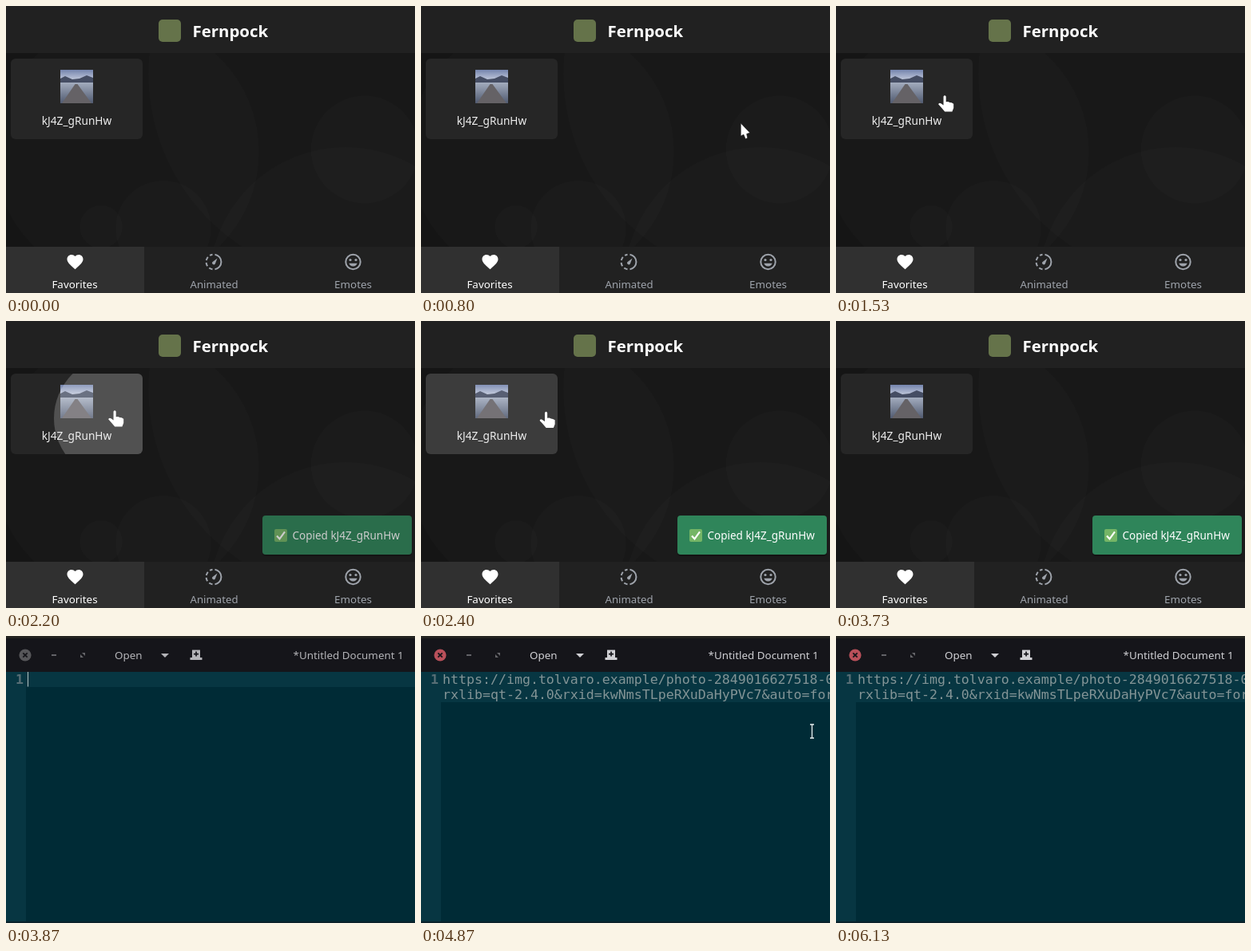
An HTML page that plays this animation: 512 px wide and 360 px high, repeating every 7140 ms.

```html
<!DOCTYPE html>
<html lang="en">
<head>
<meta charset="utf-8">
<title>Copy and paste demo</title>
<style>
  html, body { margin: 0; width: 100%; height: 100%; overflow: hidden; background: #151515; }
  svg { display: block; width: 512px; height: 360px; }
  text { font: 13.4px "Noto Sans", sans-serif; white-space: pre; }
  .mid { text-anchor: middle; }
  .title { font-size: 20.4px; font-weight: bold; }
  .code { font: 16.6px "DejaVu Sans Mono", monospace; fill: #839496; }
  .num { font-weight: bold; fill: #586e75; }
  .glow { fill: #fff; fill-opacity: .013; }
  .tab { fill: #9ea3ab; }
</style>
</head>
<body>
<svg viewBox="0 0 512 360">
  <defs>
    <clipPath id="cardClip"><rect x="6" y="66" width="165" height="101" rx="6"/></clipPath>
    <linearGradient id="sky" x2="0" y2="1">
      <stop stop-color="#7484ad"/><stop offset="1" stop-color="#d5dae6"/>
    </linearGradient>
    <linearGradient id="lake" x2="0" y2="1">
      <stop stop-color="#a3acbe"/><stop offset="1" stop-color="#505a70"/>
    </linearGradient>
  </defs>

  <g id="app">
    <rect width="512" height="360" fill="#151515"/>
    <g class="glow">
      <circle cx="151" cy="183" r="166"/>
      <circle cx="437" cy="85" r="259"/>
      <circle cx="449" cy="180" r="67.5"/>
      <circle cx="425" cy="348" r="171"/>
      <circle cx="197" cy="279" r="60"/>
      <circle cx="119" cy="277" r="27"/>
    </g>
    <rect width="512" height="59" fill="#212121"/>
    <rect x="191" y="17" width="28" height="28" rx="5" fill="#65734a"/>
    <text class="title" x="233.5" y="39" fill="#fff">Fernpock</text>

    <g clip-path="url(#cardClip)">
      <rect x="6" y="66" width="165" height="101" fill="#262626"/>
      <rect x="68" y="80" width="41" height="16" fill="url(#sky)"/>
      <path d="M68 91l6-3 9 4 9-1 9-4 8 3v7H68z" fill="#454d63"/>
      <rect x="68" y="96" width="41" height="26" fill="url(#lake)"/>
      <path d="M86.5 98h3l17.5 24H70z" fill="#656266"/>
      <circle id="ripple" cx="138" cy="122" fill="#fff"/>
      <text class="mid" x="88.5" y="149" fill="#eee" style="font-size:13.7px">kJ4Z_gRunHw</text>
    </g>

    <rect y="302" width="512" height="58" fill="#212121"/>
    <rect y="302" width="173" height="58" fill="#303030"/>
    <path transform="translate(74.5 309)" fill="#fff" d="M12 21.35l-1.45-1.32C5.4 15.36 2 12.28 2 8.5 2 5.42 4.42 3 7.5 3c1.74 0 3.41.81 4.5 2.09C13.09 3.81 14.76 3 16.5 3 19.58 3 22 5.42 22 8.5c0 3.78-3.4 6.86-8.55 11.54z"/>
    <text class="mid" x="86" y="354" fill="#fff">Favorites</text>
    <g class="tab">
      <g fill="none" stroke="#9ea3ab" stroke-width="2">
        <path d="M261.5 311.8a9.3 9.3 0 0 1 0 18.4"/>
        <path d="M258.5 330.2a9.3 9.3 0 0 1 0-18.4" stroke-dasharray="4.6 3"/>
        <circle cx="434.5" cy="321" r="9.2"/>
      </g>
      <path d="M264.5 316.5l-2.7 7a2.1 2.1 0 0 1-3.5-2.3z"/>
      <circle cx="431" cy="318.5" r="1.6"/><circle cx="438" cy="318.5" r="1.6"/>
      <path d="M429.3 322.8h10.4a5.5 5.5 0 0 1-10.4 0z"/>
      <text class="mid" x="260.5" y="354" style="font-size:13.2px">Animated</text>
      <text class="mid" x="434.5" y="354">Emotes</text>
    </g>

    <g id="toast">
      <rect x="321" y="245" width="187" height="50" rx="4" fill="#000" opacity=".3"/>
      <rect x="321" y="244" width="187" height="49" rx="4" fill="#2f855a"/>
      <rect x="336" y="261" width="16" height="16" rx="2" fill="#74b566"/>
      <path d="M339 269.5l3.5 3.8 6.5-9" fill="none" stroke="#fff" stroke-width="2.2"/>
      <text x="358.5" y="274" fill="#fff" style="font-size:13.5px">Copied kJ4Z_gRunHw</text>
    </g>
  </g>

  <g id="editor">
    <rect width="512" height="360" fill="#002b36"/>
    <rect width="512" height="45" fill="#15151a"/>
    <rect width="512" height="3" fill="#232320"/>
    <circle id="close" cx="24" cy="24" r="7.6"/>
    <path d="M21.3 21.3l5.4 5.4m0-5.4l-5.4 5.4" stroke="#15151a" stroke-width="1.8"/>
    <path d="M57 24h6" stroke="#77777b" stroke-width="1.6"/>
    <path d="M95 21h4v4zM93 23l4 4h-4z" fill="#66666a"/>
    <g id="bar">
      <text x="136" y="28.7">Open</text>
      <path d="M194 22h10l-5 5z"/>
      <path fill-rule="evenodd" d="M233 17.5h10v9.5h2.5v3h-15v-3h2.5zM237.2 19.5v2.2h-2.2v1.7h2.2v2.2h1.7v-2.2h2.2v-1.7h-2.2v-2.2z"/>
      <text x="359.5" y="28.7">*Untitled Document 1</text>
    </g>
    <rect y="45" width="25" height="315" fill="#073642"/>
    <rect id="line" y="45" width="512" fill="#073642"/>
    <text class="code num" x="12" y="60">1</text>
    <g id="pasted">
      <text class="code" x="27" y="60">https://img.tolvaro.example/photo-2849016627518-0</text>
      <text class="code" x="27" y="79">rxlib=qt-2.4.0&amp;rxid=kwNmsTLpeRXuDaHyPVc7&amp;auto=for</text>
    </g>
    <rect id="caret" x="27" y="45" width="1" height="18.5" fill="#b4c0c0"/>
    <rect y="358" width="512" height="2" fill="#0a222b"/>
  </g>

  <g id="pointer" stroke-linejoin="round">
    <path id="hand" transform="scale(1.12)" fill="#fff" d="M-1.3 1q1.4-2.4 2.8 0v6l2.2-.3 2.1.8 2 .4 2.2 1.2v4.8l-1.6 4h-8.2l-4.6-5.4-2.6-2.8q.6-2.4 3-.9l2.7 2z"/>
    <path id="arrow" fill="#fff" stroke="#222" stroke-width=".6" d="M0 0v16l3.6-1.8 2.4 5.6 2.4-1.4-1-5 4-1.4z"/>
    <path id="beam" fill="none" stroke="#e8eeee" stroke-width="1.3" d="M-2.5-8.5h5m-2.5 0v17m-2.5 0h5"/>
  </g>
</svg>
<script>
const LOOP = 7140, FPS = 15, CUT = 3860, FOCUS = 4330, PASTE = 4860;

// pointer stops: time, x, y
const appPath = [[590, 500, 160], [1200, 136, 112.5], [2330, 136, 112.5], [2800, 477, 138], [2940, 516, 141]];
const editorPath = [[4060, 516, 150], [4400, 489.5, 119.5], [5595, 489.5, 119.5]];

const $ = id => document.getElementById(id);
const set = (id, attrs) => {
  for (const name in attrs) $(id).setAttribute(name, attrs[name]);
};
const show = (id, on) => set(id, { visibility: on ? 'inherit' : 'hidden' });
const ramp = (t, from, to) => Math.min(1, Math.max(0, (t - from) / (to - from)));

function pointOn(path, t) {
  const i = path.findIndex(stop => stop[0] > t);
  if (i < 1) return null;
  const [t0, x0, y0] = path[i - 1], [t1, x1, y1] = path[i];
  const p = ramp(t, t0, t1), k = p * p * (3 - 2 * p);
  return [x0 + (x1 - x0) * k, y0 + (y1 - y0) * k];
}

function draw(t) {
  const editing = t >= CUT, focused = t >= FOCUS, pasted = t >= PASTE;
  show('app', !editing);
  show('editor', editing);

  set('ripple', { r: 15 + 135 * ramp(t, 2060, 2360), opacity: t < 2060 ? 0 : .2 * (1 - ramp(t, 2270, 2530)) });
  set('toast', { opacity: ramp(t, 1990, 2260) });

  set('close', { fill: focused ? '#b9505a' : '#57575a' });
  set('bar', { fill: focused ? '#d0d0d4' : '#b4b4b8' });
  set('line', { height: pasted ? 38 : 19 });
  show('pasted', editing && pasted);
  show('caret', editing && t < 4595);

  const point = pointOn(editing ? editorPath : appPath, t);
  const overCard = point && point[0] < 171;
  if (point) set('pointer', { transform: `translate(${point})` });
  show('hand', point && !editing && overCard);
  show('arrow', point && !editing && !overCard);
  show('beam', point && editing);
}

function tick() {
  const t = performance.now() % LOOP;
  draw(Math.floor((t + 5) * FPS / 1000) * 1000 / FPS);
  requestAnimationFrame(tick);
}
tick();
</script>
</body>
</html>
```
